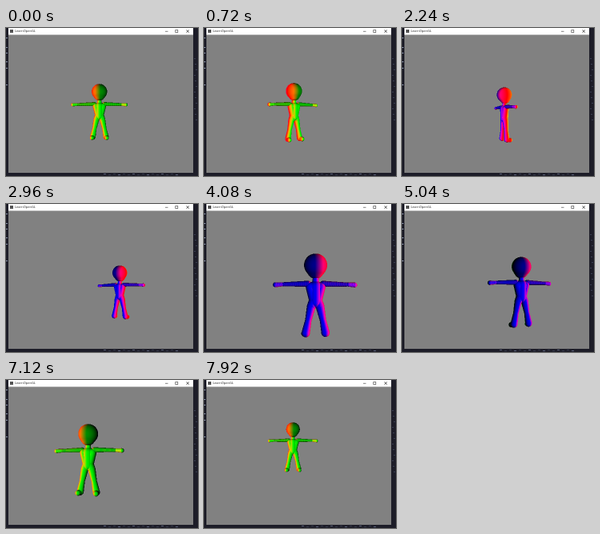
Write an HTML page with a canvas that moves like this. It is 240 by 186 pixels and loops after 8000 ms.

```html
<!DOCTYPE html>
<html lang="en">
<head>
<meta charset="utf-8">
<title>LearnOpenGL</title>
<style>
  html, body { margin: 0; width: 100%; height: 100%; overflow: hidden; background: #1d1d28; }
  #stage { position: relative; width: 240px; height: 186px; overflow: hidden; }
  canvas { position: absolute; left: 0; top: 0; width: 240px; height: 186px; }
  #title { position: absolute; left: 11px; top: 1px; font: 4px/6px "Open Sans", "Noto Sans", sans-serif; color: #222; white-space: nowrap; }
</style>
</head>
<body>
<div id="stage">
  <canvas id="view" width="480" height="372"></canvas>
  <div id="title">LearnOpenGL</div>
</div>
<script>
const W = 240, H = 186, SS = 2, LOOP = 8000, STEP = 80;
const ctx = document.getElementById('view').getContext('2d');
const rect = (color, x, y, w, h) => { ctx.fillStyle = color; ctx.fillRect(x, y, w, h); };

// time, centre x, top y, foot y, yaw in degrees
const keys = [
  [0, 116.5, 70, 140, 0],
  [1440, 112, 69, 144, 68],
  [2960, 142, 77, 144, 150],
  [4080, 139.3, 62, 167, 186],
  [6080, 152, 71, 138, 243],
  [7120, 102.5, 55, 145, 342],
  [7920, 111, 53, 115, 359]
];
const pauses = new Set([400, 880, 1360, 1840, 2320, 2720, 3200, 3680, 4160,
  4640, 5120, 5600, 6000, 6480, 6960, 7360, 7840]);

function slope(i, c) {
  const a = keys[Math.max(0, i - 1)], b = keys[Math.min(keys.length - 1, i + 1)];
  return (b[c] - a[c]) / (b[0] - a[0]);
}

function pose(t) {
  let i = 0;
  while (i < keys.length - 2 && t >= keys[i + 1][0]) i++;
  const a = keys[i], b = keys[i + 1], d = b[0] - a[0], u = (t - a[0]) / d;
  const u2 = u * u, u3 = u2 * u;
  return [1, 2, 3, 4].map(c =>
    (2 * u3 - 3 * u2 + 1) * a[c] + (u3 - 2 * u2 + u) * d * slope(i, c) +
    (3 * u2 - 2 * u3) * b[c] + (u3 - u2) * d * slope(i + 1, c));
}

// Plain mannequin made of tapered rows of spheres, one unit tall.
// A part's gain scales green and blue, its warmth adds red.
const balls = [];
function limb(from, to, gain = 0.95, warm = 0.1) {
  const n = Math.ceil(Math.hypot(...[0, 1, 2].map(c => to[c] - from[c])) / 0.006);
  for (let i = 0; i <= n; i++) {
    balls.push([...from.map((v, c) => v + (to[c] - v) * i / n), gain, warm]);
  }
}
limb([0, 0.862, 0, 0.138], [0, 0.795, 0.01, 0.098], 0.55, 0.2);
limb([0, 0.7, 0, 0.035], [0, 0.62, 0, 0.045]);
limb([0, 0.6, 0, 0.075], [0, 0.42, 0, 0.07]);
for (const s of [-1, 1]) {
  limb([0, 0.6, 0, 0.065], [s * 0.06, 0.6, 0, 0.058]);
  limb([s * 0.06, 0.6, 0, 0.058], [s * 0.02, 0.44, 0, 0.058]);
  limb([s * 0.02, 0.44, 0, 0.058], [s * 0.045, 0.38, 0, 0.055]);
  limb([s * 0.09, 0.638, 0, 0.036], [s * 0.4, 0.63, 0, 0.024], 0.75);
  limb([s * 0.4, 0.63, 0, 0.025], [s * 0.475, 0.625, 0.01, 0.03], 0.95, 0.4);
  limb([s * 0.052, 0.37, 0, 0.052], [s * 0.088, 0.2, 0, 0.038]);
  limb([s * 0.088, 0.2, 0, 0.038], [s * 0.118, 0.05, 0, 0.05]);
  limb([s * 0.118, 0.045, 0, 0.046], [s * 0.13, 0.038, 0.06, 0.038]);
}

const PW = W * SS, PH = H * SS;
const depth = new Float32Array(PW * PH);
const tone = v => Math.max(0, Math.min(1, v)) * 255;

function drawFigure([cx, top, foot, yaw]) {
  const img = ctx.getImageData(0, 0, PW, PH), px = img.data;
  const size = (foot - top) * SS, a = yaw * Math.PI / 180;
  const cos = Math.cos(a), sin = Math.sin(a);
  depth.fill(-9);
  for (const [x, y, z, r, gain, warm] of balls) {
    const vz = z * cos - x * sin, p = 1 / (1 - vz / 4);
    const sx = cx * SS + (x * cos + z * sin) * p * size;
    const sy = foot * SS - (0.5 + (y - 0.5) * p) * size;
    const rad = r * p * size;
    for (let j = Math.ceil(sy - rad); j <= sy + rad; j++) {
      for (let i = Math.ceil(sx - rad); i <= sx + rad; i++) {
        const nx = (i - sx) / rad, ny = (j - sy) / rad, q = 1 - nx * nx - ny * ny;
        if (q < 0 || i < 0 || j < 0 || i >= PW || j >= PH) continue;
        const nz = Math.sqrt(q), k = j * PW + i, d = vz + nz * r;
        if (d <= depth[k]) continue;
        depth[k] = d;
        // Colour follows the surface direction: right red, front green, back blue
        const side = nx * cos - nz * sin, front = nx * sin + nz * cos;
        px[k * 4] = tone(warm - side * 1.4);
        px[k * 4 + 1] = tone(front * gain);
        px[k * 4 + 2] = tone(-front * gain);
      }
    }
  }
  ctx.putImageData(img, 0, 0);
}

function drawWindow() {
  rect('#1d1d28', 0, 0, W, H);
  for (const y of [12, 24, 31, 42, 50, 71]) rect('#8a93a8', 0, y, 2, 1);
  for (let i = 0; i < 12; i++) rect('#3a3f52', 235 + i % 3, 38 + i * 7, 2, 1);
  for (let i = 0; i < 16; i++) rect(i % 3 ? '#34384a' : '#596078', 122 + i * 6, 183 + i % 2, 3, 1);
  rect('#fff', 3, 0, 231, 8.5);
  rect('#818181', 3, 8.5, 231, 173.5);
  rect('#555', 5, 2, 4, 4);
  ctx.strokeStyle = '#333';
  ctx.lineWidth = 0.6;
  ctx.strokeRect(211.8, 2.5, 3, 3);
  ctx.beginPath();
  ctx.moveTo(199, 4.2); ctx.lineTo(202.5, 4.2);
  ctx.moveTo(225.5, 2.5); ctx.lineTo(228.8, 5.8);
  ctx.moveTo(228.8, 2.5); ctx.lineTo(225.5, 5.8);
  ctx.stroke();
}

let shown = -1;
const start = performance.now();
function frame() {
  const t = (performance.now() - start) % LOOP;
  let step = Math.floor(t / STEP) * STEP;
  if (pauses.has(step)) step -= STEP;
  if (step !== shown) {
    shown = step;
    ctx.setTransform(SS, 0, 0, SS, 0, 0);
    drawWindow();
    drawFigure(pose(step));
  }
  requestAnimationFrame(frame);
}
frame();
</script>
</body>
</html>
```
